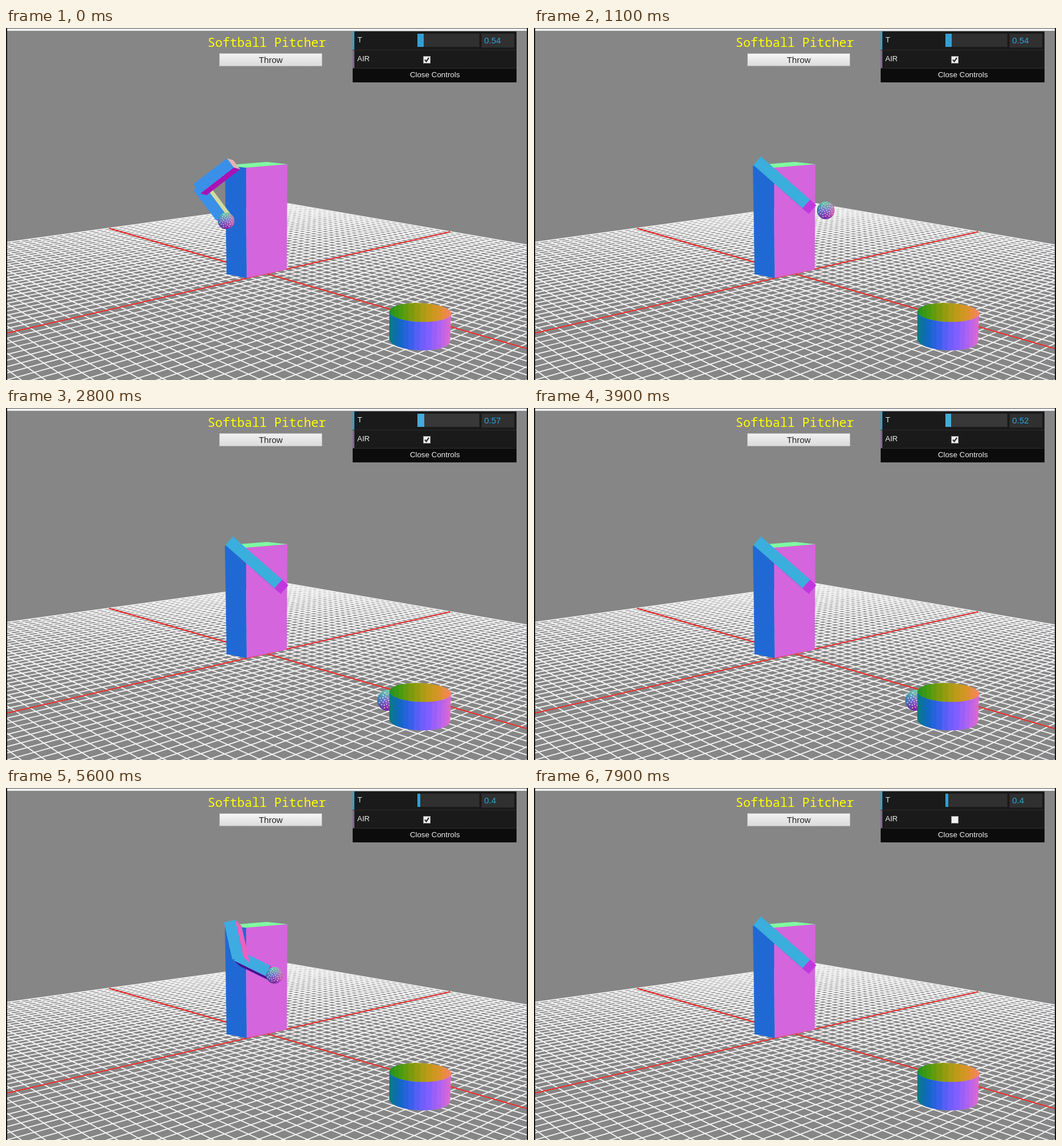
These frames come from a looping animation (911 by 615 pixels, 8000 ms). An HTML page with a canvas:

```html
<!DOCTYPE html>
<html lang="en">
<head>
<meta charset="utf-8">
<title>Softball Pitcher</title>
<style>
html, body { margin: 0; width: 100%; height: 100%; overflow: hidden; background: #868686; }
canvas { display: block; width: 911px; height: 615px; }
</style>
</head>
<body>
<canvas id="stage" width="911" height="615"></canvas>
<script>
const LOOP = 8000, STEP = 100, W = 911, H = 615;
const canvas = document.getElementById('stage');
let ctx = canvas.getContext('2d');

const lerp = (a, b, k) => a + (b - a) * k;
const clamp = k => Math.max(0, Math.min(1, k));
const rgb = c => `rgb(${c.map(Math.round)})`;
const mix = (a, b, k) => a.map((v, i) => lerp(v, b[i], k));

function ramp(stops, k) {
  const pos = clamp(k) * (stops.length - 1);
  const i = Math.min(stops.length - 2, Math.floor(pos));
  return mix(stops[i], stops[i + 1], pos - i);
}
function rect(x, y, w, h, fill) {
  ctx.fillStyle = fill;
  ctx.fillRect(x, y, w, h);
}
function poly(points, fill) {
  ctx.beginPath();
  points.forEach(p => ctx.lineTo(p[0], p[1]));
  ctx.closePath();
  ctx.fillStyle = fill;
  ctx.fill();
}
function text(str, x, y, font, fill, align = 'left') {
  ctx.font = font;
  ctx.fillStyle = fill;
  ctx.textAlign = align;
  ctx.fillText(str, x, y);
}

// Ground plane: u and v run from -1 to 1 along the two red axes.
function ground(u, v) {
  const a = -0.3278 * u, b = -0.332 * v, d = 1 + a + b;
  return [(455 - 659 * a + 1739 * b) / d, (429.3 + 108 * a + 135 * b) / d];
}
function gridLine(from, to, color) {
  ctx.strokeStyle = color;
  ctx.beginPath();
  ctx.moveTo(...ground(...from));
  ctx.lineTo(...ground(...to));
  ctx.stroke();
}
function drawScene() {
  rect(0, 0, W, H, '#868686');
  const cells = 30;
  ctx.lineWidth = 1.9;
  for (let i = -cells; i <= cells; i++) {
    const k = i / cells;
    gridLine([k, -1], [k, 1], '#f2f2f2');
    gridLine([-1, k], [1, k], '#f2f2f2');
  }
  gridLine([-1, 0], [1, 0], '#e81c1c');
  gridLine([0, -1], [0, 1], '#e81c1c');

  poly([[382, 240], [419, 244], [420, 437], [385, 430]], '#2069d4');
  poly([[419, 244], [491, 238], [490, 422], [420, 437]], '#d465dc');
  poly([[382, 240], [419, 244], [491, 238], [455, 234]], '#80fba2');

  rect(0, 0, W, 1, '#55555a');
  rect(0, 1, W, 4, '#eeeeee');
  rect(0, 0, 2, H, '#14141c');
  rect(909, 0, 2, H, '#14141c');
  text('Softball Pitcher', 352, 33, '21.5px "Noto Sans Mono", monospace', '#ffff00');
}

const scene = document.createElement('canvas');
scene.width = W;
scene.height = H;
const screen = ctx;
ctx = scene.getContext('2d');
drawScene();
ctx = screen;

// Each throw: reset, wind-up start, release, launch speed in px/ms, farthest resting point.
const GRAVITY = 0.0005;
const throws = [
  { reset: 0, start: 480, release: 1020, vx: 0.29, vy: -0.02, rest: [666, 511], scores: false },
  { reset: 5100, start: 5270, release: 5670, vx: 0.423, vy: 0.092, rest: [730, 532], scores: true }
];

// Box limb seen from the front, extruded by the depth vector; sides without a colour are hidden.
function limb(from, angle, length, depth, { front, sides }) {
  const half = 10;
  const dir = [Math.cos(angle), Math.sin(angle)], side = [dir[1], -dir[0]];
  const at = (along, across) => [0, 1].map(i => from[i] + dir[i] * along + side[i] * across);
  const corners = [at(-2, half), at(length, half), at(length, -half), at(-2, -half)];
  const back = p => [p[0] + depth[0], p[1] + depth[1]];
  const normals = [side, dir, side.map(n => -n), dir.map(n => -n)];
  normals.forEach((n, i) => {
    if (!sides[i] || n[0] * depth[0] + n[1] * depth[1] <= 0) return;
    const a = corners[i], b = corners[(i + 1) % 4];
    poly([a, b, back(b), back(a)], sides[i]);
  });
  poly(corners, front);
}

function drawArm(progress) {
  const swing = progress ** 2.3, unfold = progress ** 4.5, rad = Math.PI / 180;
  const upper = lerp(142.3, 41.3, swing) * rad;
  const lower = upper + lerp(-89, 0, unfold) * rad;
  const shoulder = mix([390, 237], [391, 233.3], swing);
  const upperLength = lerp(68, 56, swing), lowerLength = lerp(64, 56, swing);
  const depth = [11, 3 + 7 * Math.min(1, swing * 1.9)];
  const move = (p, angle, n) => [p[0] + Math.cos(angle) * n, p[1] + Math.sin(angle) * n];
  const elbow = move(shoulder, upper, upperLength);
  const hand = move(elbow, lower, lowerLength);
  const front = rgb(ramp([[58, 144, 232], [69, 168, 236], [62, 172, 224], [58, 174, 221]], swing));
  const under = rgb(mix([170, 18, 180], [234, 98, 192], clamp(swing * 3.4)));
  limb(elbow, lower, lowerLength, depth,
    { front, sides: ['#d0dca0', '#c038dc', '#481090', null] });
  limb(shoulder, upper, upperLength + 4, depth,
    { front, sides: [under, null, null, '#e8b4b4'] });
  const grip = move(hand, lower, 7);
  return [grip[0] + depth[0] / 2, grip[1] + depth[1] / 2];
}

function drawBall(x, y, r) {
  ctx.save();
  ctx.translate(x, y);
  ctx.scale(r, r);
  ctx.beginPath();
  ctx.arc(0, 0, 1, 0, 7);
  ctx.clip();
  const fall = ctx.createLinearGradient(0, -1, 0, 1);
  ['#78f0a0', '#70b8b4', '#7c70cc', '#9a22b0', '#70108c'].forEach((c, i) => fall.addColorStop(i / 4, c));
  rect(-1, -1, 2, 2, fall);
  const across = ctx.createLinearGradient(-1, 0, 1, 0);
  across.addColorStop(0, 'rgba(0,130,150,.6)');
  across.addColorStop(0.45, 'rgba(90,110,220,.2)');
  across.addColorStop(1, 'rgba(255,110,160,.75)');
  rect(-1, -1, 2, 2, across);
  for (let i = 0; i < 32; i++) {
    const far = 0.84 * Math.sqrt((i + 0.5) / 32), turn = i * 2.4;
    ctx.beginPath();
    ctx.arc(Math.cos(turn) * far, Math.sin(turn) * far, 0.06, 0, 7);
    ctx.fillStyle = ['#f4e8ff', '#f0b8c8', '#b8f0e0', '#e8d890'][i % 4];
    ctx.fill();
  }
  ctx.restore();
}

const OUTER = [[6, 124, 126], [16, 104, 196], [50, 96, 232], [100, 94, 250], [136, 94, 255], [178, 98, 240], [228, 104, 204]];
const INNER = [[30, 146, 30], [78, 156, 14], [136, 154, 14], [184, 156, 22], [216, 148, 40], [255, 130, 98]];
const TOP = { x: 723, y: 497, rx: 54, ry: 16.6 };
const BASE = { x: 722, y: 546, rx: 53, ry: 17.2 };
const FACETS = 16, TILT = 0.035;

const rim = (ring, i, bulge) => {
  const a = Math.PI * Math.min(i, FACETS) / FACETS, dx = -ring.rx * Math.cos(a);
  return [ring.x + dx, ring.y + dx * TILT + bulge * ring.ry * Math.sin(a)];
};
// The far half shows the inside, the near half the outside; shade follows the facet's sideways facing.
function bucketFacets(stops, top, bottom) {
  for (let i = 0; i < FACETS; i++) {
    const j = i + 1.06, shade = (1 - Math.cos(Math.PI * (i + 0.5) / FACETS)) / 2;
    poly([top(i), top(j), bottom(j), bottom(i)], rgb(ramp(stops, shade)));
  }
}
const bucketInside = () => bucketFacets(INNER, i => rim(TOP, i, -1), i => rim(TOP, i, 1));
const bucketWall = () => bucketFacets(OUTER, i => rim(TOP, i, 1), i => rim(BASE, i, 1));

function drawPitch(t) {
  const pitch = throws[t < throws[1].reset ? 0 : 1];
  const progress = clamp((t - pitch.start) / (pitch.release - pitch.start));
  const grip = drawArm(progress);
  const dt = t - pitch.release;
  let ball = null;
  if (dt >= 0) {
    const x = 486 + pitch.vx * dt, y = 317 + pitch.vy * dt + GRAVITY * dt * dt;
    ball = [Math.min(pitch.rest[0], x), Math.min(pitch.rest[1], y), lerp(15, 18, clamp((x - 486) / 165))];
  } else {
    drawBall(...grip, 14.5);
  }
  if (ball && !pitch.scores) drawBall(...ball);
  bucketInside();
  if (ball && pitch.scores) drawBall(...ball);
  bucketWall();
}

const sliderSteps = [[0, 0.54], [2200, 0.56], [2800, 0.57], [3000, 0.58], [3200, 0.56],
  [3700, 0.54], [3900, 0.52], [4000, 0.45], [4100, 0.4]];
const between = (t, a, b) => t >= a && t < b;

function drawControls(t) {
  const hoverButton = between(t, 200, 1400) || between(t, 4900, 6800);
  const sans = '"Liberation Sans", Arial, sans-serif';
  const face = ctx.createLinearGradient(0, 44, 0, 67);
  face.addColorStop(0, hoverButton ? '#f8f8f8' : '#f2f2f2');
  face.addColorStop(1, '#dadada');
  rect(372, 44, 180, 23, hoverButton ? '#a0a0a0' : '#b4b4b4');
  rect(373, 45, 178, 21, face);
  text('Throw', 462, 61, `15px ${sans}`, '#222', 'center');

  const hoverAir = between(t, 1400, 2000) || between(t, 7000, 7900);
  rect(605, 6, 286, 89, '#000');
  rect(605, 6, 286, 32, '#1a1a1a');
  rect(605, 38, 286, 1, '#2c2c2c');
  rect(605, 39, 286, 31, hoverAir ? '#111' : '#1a1a1a');
  rect(605, 70, 286, 1, '#2c2c2c');
  rect(605, 71, 286, 24, '#0c0c0c');
  rect(605, 6, 3, 32, '#2fa1d6');
  rect(605, 39, 3, 31, '#806787');

  const value = sliderSteps.filter(s => s[0] <= t).pop()[1];
  const active = between(t, 2800, 4800);
  rect(718, 10, 108, 23, active ? '#383838' : '#303030');
  rect(718, 10, Math.round(11 - (0.54 - value) * 43), 23, active ? '#44abda' : '#2fa1d6');
  rect(830, 10, 57, 24, '#303030');
  text(String(value), 834.5, 27, `15px ${sans}`, '#2fa1d6');

  text('T', 613.5, 25, `13px ${sans}`, '#eee');
  text('AIR', 613, 58, `13px ${sans}`, '#eee');
  text('Close Controls', 748.5, 86, `13.3px ${sans}`, '#eee', 'center');

  rect(728, 49, 13, 13, '#8c8c8c');
  rect(729, 50, 11, 11, between(t, 7200, 7400) ? '#cfcfcf' : '#f0f0f0');
  if (t < 7400) {
    ctx.strokeStyle = '#333';
    ctx.lineWidth = 2.2;
    ctx.beginPath();
    ctx.moveTo(731, 55.5);
    ctx.lineTo(733.5, 58.5);
    ctx.lineTo(738, 52);
    ctx.stroke();
  }
}

function frame() {
  const t = Math.floor((performance.now() % LOOP) / STEP) * STEP;
  ctx.drawImage(scene, 0, 0);
  drawPitch(t);
  drawControls(t);
  requestAnimationFrame(frame);
}
frame();
</script>
</body>
</html>
```
